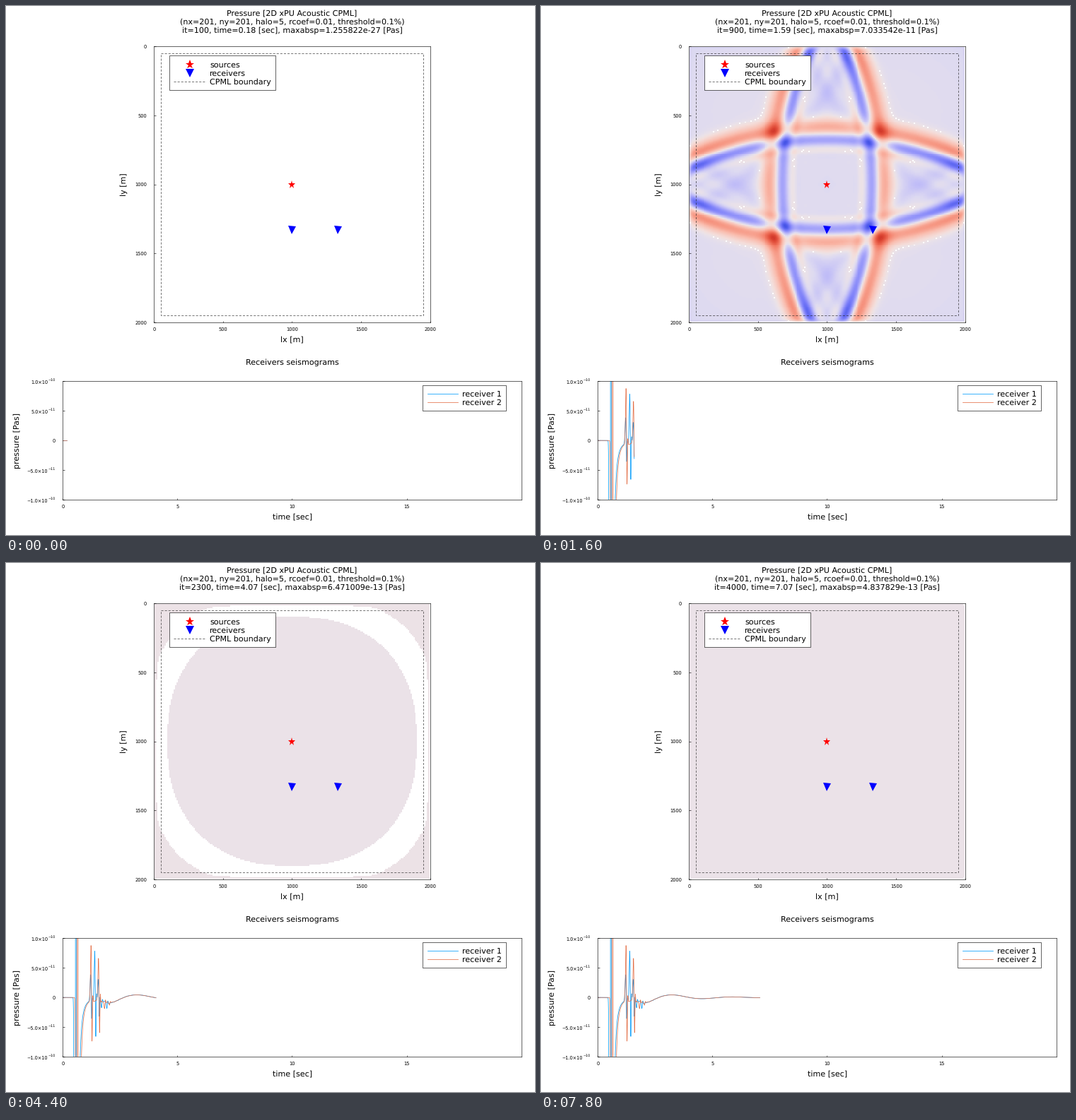
Recreate the animation shown at these times as a matplotlib script. Size 748 px wide and 749 px high, loop 8 s.

```python
import numpy as np
import matplotlib.pyplot as plt
from matplotlib.animation import FuncAnimation
from matplotlib.colors import LinearSegmentedColormap
from matplotlib.patches import Rectangle

W, H, DPI = 748, 749, 64
PX = 72 / DPI                       # points per pixel
FRAMES, STEPS = 40, 100             # time steps per frame

# Wave model: 2000 m square, velocity 2000 m/s, 10 Hz Ricker source
DX, VEL, F0, HALO, RCOEF = 10.0, 2000.0, 10.0, 5, 0.01
DT = DX / (np.sqrt(2) * VEL) / 2
PLIM, THRESHOLD = 1e-10, 0.001
MID = 100                           # grid index of the centre


def cpml(dist):
    """Damping coefficients as columns for normalised depths into the layer."""
    d0 = -3 * VEL * np.log(RCOEF) / (2 * HALO * DX)
    d = d0 * dist ** 2
    alpha = np.pi * F0 * (1 - dist)
    b = np.exp(-(d + alpha) * DT)
    a = d * (b - 1) / (d + alpha)
    return a[:, None], b[:, None]


def ricker(t):
    b = (np.pi * F0 * (t - 4 / F0)) ** 2
    return (1 - 2 * b) * np.exp(-b)


def simulate():
    """Solve one symmetric quarter; return snapshots and two receiver traces."""
    n = MID + 1
    a, b = cpml(np.arange(HALO - 1, -1, -1) / HALO)
    ah, bh = cpml(np.append(np.arange(HALO - 0.5, 0, -1), 0) / HALO)
    cour = (VEL * DT / DX) ** 2
    old, cur = np.zeros((n, n)), np.zeros((n, n))
    diff, lap = np.zeros((n, n)), np.zeros((n, n))
    psi, xi = np.zeros((HALO + 1, n)), np.zeros((HALO, n))
    mirror = np.r_[0:n, MID - 1:-1:-1]
    snaps, traces = [], np.zeros((2, FRAMES * STEPS + 1))
    for it in range(1, FRAMES * STEPS + 1):
        np.subtract(cur[1:], cur[:-1], out=diff[:-1])
        diff[-1] = -diff[-2]
        np.subtract(diff[1:], diff[:-1], out=lap[1:])
        psi = bh * psi + ah * diff[:HALO + 1]
        dpsi = psi[1:] - psi[:-1]
        edge = lap[1:HALO + 1]
        xi = b * xi + a * (edge + dpsi)
        edge += dpsi + xi
        new = 2 * cur - old + cour * (lap + lap.T)
        new[MID, MID] += DT ** 2 * ricker((it - 1) * DT) / DX ** 2
        old, cur = cur, new
        traces[:, it] = cur[MID, 67], cur[67, 67]
        if it % STEPS == 0:
            snaps.append(cur[np.ix_(mirror, mirror)])
    return snaps, traces


snaps, traces = simulate()
times = np.arange(FRAMES * STEPS + 1) * DT

STOPS = [
    (-1.0, (20, 38, 100)), (-0.8, (34, 62, 200)), (-0.65, (72, 86, 232)),
    (-0.5, (118, 122, 249)), (-0.25, (182, 179, 250)), (-0.07, (222, 218, 241)),
    (0.0, (236, 227, 232)), (0.05, (244, 222, 219)), (0.25, (250, 187, 172)),
    (0.5, (243, 122, 99)), (0.65, (224, 76, 56)), (0.8, (190, 30, 25)),
    (1.0, (132, 0, 16)),
]
cmap = LinearSegmentedColormap.from_list(
    "pressure", [((v + 1) / 2, np.array(c) / 255) for v, c in STOPS], N=256)
cmap.set_bad("white")

plt.rcParams.update({"font.family": "DejaVu Sans", "text.hinting": "none"})
fig = plt.figure(figsize=(W / DPI, H / DPI), dpi=DPI, facecolor="white")
FRAME = 0.6 * PX
THIN = 0.75 * PX


def panel(x0, y0, x1, y1, xlim, ylim, xticks, yticks):
    ax = fig.add_axes([x0 / W, 1 - y1 / H, (x1 - x0) / W, (y1 - y0) / H])
    ax.set(xlim=xlim, ylim=ylim, xticks=xticks, yticks=yticks)
    ax.tick_params(direction="in", length=2.5 * PX, width=FRAME,
                   labelbottom=False, labelleft=False)
    for s in ax.spines.values():
        s.set_linewidth(FRAME)
    return ax


field = panel(209.1, 57.1, 599.8, 448.1, (0, 2000), (2000, 0),
              range(0, 2001, 500), range(0, 2001, 500))
seis = panel(80.2, 531.2, 728.8, 699.1, (0, 20), (-PLIM, PLIM),
             range(0, 16, 5), np.linspace(-PLIM, PLIM, 5))
page = fig.add_axes([0, 0, 1, 1])
page.set(xlim=(0, W), ylim=(H, 0))
page.axis("off")


def text(x, y, s, size=11.08, ha="center", rotation=0):
    """Place text by the middle of its capital height."""
    drop = 0.3645 * size
    x, y = (x + drop, y) if rotation else (x, y + drop)
    return page.text(x, y, s, fontsize=size * PX, ha=ha, va="baseline",
                     rotation=rotation, rotation_mode="anchor")


DASH = dict(color="#202020", lw=FRAME, ls=(0, (3.1 / 0.6, 2 / 0.6)),
            dash_capstyle="butt")
STAR = dict(marker="*", color="red", mew=0, ls="none")
TRI = dict(marker="v", color="blue", mew=0, ls="none")
BLUE, ORANGE = "#009AFA", "#E36F47"
plt.rcParams["lines.scale_dashes"] = True


def box(x0, y0, x1, y1):
    page.add_patch(Rectangle((x0, y0), x1 - x0, y1 - y0, fc="white",
                             ec="black", lw=FRAME))


# Pressure field
image = field.imshow(np.zeros((201, 201)), cmap=cmap, vmin=-PLIM, vmax=PLIM,
                     extent=(-5, 2005, 2005, -5), interpolation="nearest",
                     aspect="auto")
field.set(xlim=(0, 2000), ylim=(2000, 0))
field.plot([50, 1950, 1950, 50, 50], [50, 50, 1950, 1950, 50], **DASH)
field.plot(1000, 1000, ms=11.5 * PX, **STAR)
field.plot([1000, 1330], [1330, 1330], ms=11 * PX, **TRI)
for v in range(0, 2001, 500):
    pos = v * 390.7 / 2000
    text(209.3 + pos, 458, str(v), 6.6)
    text(199.2, 57.5 + pos, str(v), 6.6, ha="right")
text(404.6, 472, "lx [m]")
text(166, 253, "ly [m]", rotation=90)
title = [text(404.6, y, "") for y in (9.8, 21.8, 33.8)]
title[0].set_text("Pressure [2D xPU Acoustic CPML]")
title[1].set_text("(nx=201, ny=201, halo=5, rcoef=0.01, threshold=0.1%)")

box(231, 70, 381, 118.6)
page.plot(260, 82.7, ms=13.5 * PX, **STAR)
page.plot(260, 94.7, ms=12 * PX, **TRI)
page.plot([237.5, 283], [107, 107], **DASH)
for y, s in zip((82.8, 94.9, 107), ("sources", "receivers", "CPML boundary")):
    text(288, y, s, ha="left")

# Seismograms
lines = [seis.plot([], [], color=c, lw=THIN)[0] for c in (BLUE, ORANGE)]
for v in range(0, 16, 5):
    text(80.3 + v * 648.5 / 20, 708.5, str(v), 6.6)
for y, s, e in ((531.2, "1.0", 10), (573.2, "5.0", 11),
                (657.2, "−5.0", 11), (699.2, "−1.0", 10)):
    text(59.3, y + 1.3, s + "×10", 6.5, ha="right")
    text(59.3, y - 2, f"−{e}", 4.9, ha="left")
text(70, 615.2, "0", 6.6, ha="right")
text(404.6, 504, "Receivers seismograms")
text(404.6, 723, "time [sec]")
text(15, 615, "pressure [Pas]", rotation=90)

box(589, 537, 707, 573)
for y, c, s in ((549, BLUE, "receiver 1"), (561, ORANGE, "receiver 2")):
    page.plot([596, 639.5], [y, y], color=c, lw=THIN)
    text(645.5, y + 0.2, s, ha="left")


def draw(k):
    it, p = (k + 1) * STEPS, snaps[k]
    size = np.abs(p)
    image.set_data(np.ma.masked_where(size <= THRESHOLD * PLIM, p))
    title[2].set_text(
        f"it={it}, time={it * DT:.2f} [sec], maxabsp={size.max():.6e} [Pas]")
    for line, trace in zip(lines, traces):
        line.set_data(times[:it + 1], trace[:it + 1])
    return [image, title[2], *lines]


anim = FuncAnimation(fig, draw, frames=FRAMES, interval=200, repeat=True,
                     repeat_delay=0, init_func=lambda: draw(0), blit=False)
plt.show()
```
